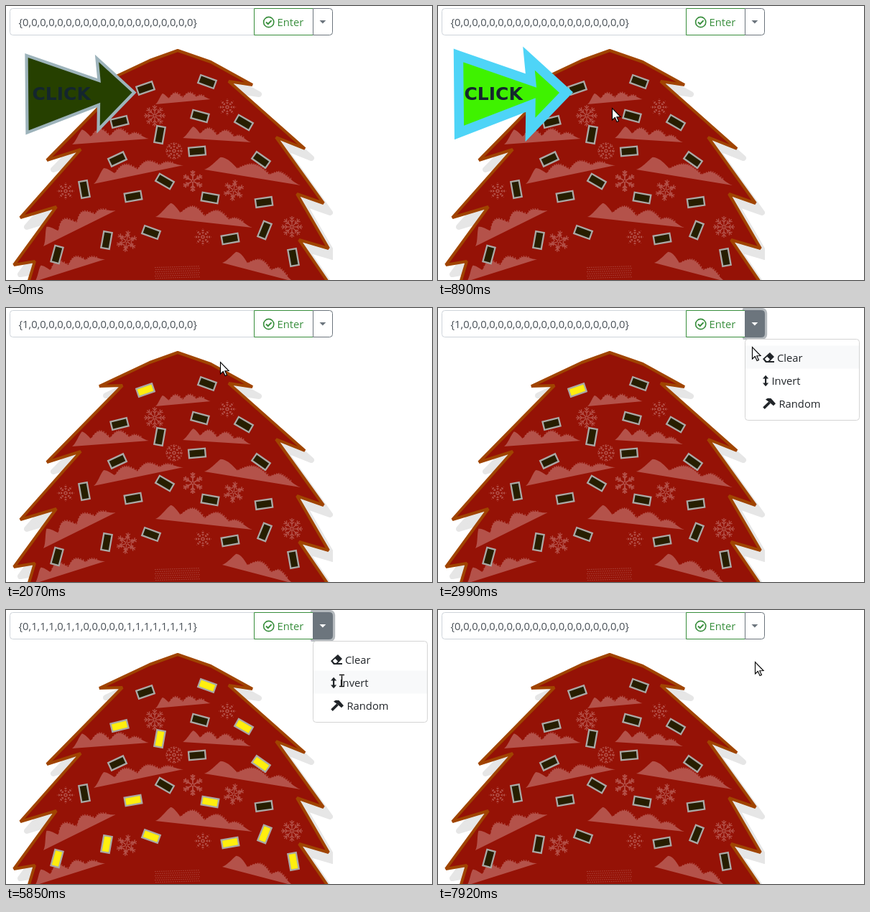
An HTML page with a canvas for the animation above (7990 ms loop, 593 by 382 pixels).

```html
<!DOCTYPE html>
<html lang="en">
<head>
<meta charset="utf-8">
<title>Tree lights</title>
<style>
html, body { margin: 0; width: 100%; height: 100%; overflow: hidden; background: #fff; }
canvas { display: block; }
</style>
</head>
<body>
<canvas id="stage" width="593" height="382"></canvas>
<script>
const W = 593, H = 382, LOOP = 7990;
const ctx = document.getElementById('stage').getContext('2d');
const FONT = '14.75px "Open Sans", "Noto Sans", sans-serif';
const GREY = [108, 117, 125], WHITE = [255, 255, 255];
const DARK = [38, 30, 0], LIT = [255, 238, 14];
const SNOW = '#b4524a';

const clamp = v => Math.max(0, Math.min(1, v));
const ease = k => k * k * (3 - 2 * k);
const mix = (a, b, k) => `rgb(${a.map((v, i) => Math.round(v + (b[i] - v) * k)).join()})`;

function poly(c, pts) {
  c.beginPath();
  pts.forEach(([x, y]) => c.lineTo(x, y));
  c.closePath();
}

function seg(c, x0, y0, x1, y1) {
  c.beginPath();
  c.moveTo(x0, y0);
  c.lineTo(x1, y1);
  c.stroke();
}

// ---------- tree ----------

// outline from the top: tip, notch, tip, notch ... on each side
const RIGHT = [[285, 78], [343, 110], [310, 105], [416, 199], [376, 183], [442, 275],
  [405, 262], [449, 338], [408, 326], [449, 386]];
const LEFT = [[200, 76], [130, 109], [162, 108], [57, 215], [104, 200], [20, 295],
  [70, 280], [11, 361], [40, 356], [31, 386]];
const TREE = [[239, 62], ...RIGHT, ...LEFT.reverse()];

// base line ends, hump count, height
const HILLS = [[208, 137, 285, 130, 4, 15], [92, 193, 199, 185, 4, 21], [246, 184, 341, 190, 4, 18],
  [122, 248, 247, 222, 4, 20], [276, 228, 410, 250, 3, 22], [52, 335, 153, 285, 4, 24],
  [208, 294, 343, 309, 4, 23], [40, 384, 138, 353, 4, 20], [301, 358, 400, 384, 3, 21]];

const FLAKES = { dots: [[308, 141], [83, 258], [274, 322]], line: [[207, 153], [398, 308]],
  ring: [[234, 202]], star: [[317, 257], [168, 328]], bold: [[260, 244]] };

function hill(c, x0, y0, x1, y1, n, h) {
  const len = Math.hypot(x1 - x0, y1 - y0);
  const top = u => -h * Math.min(1, u * 7, (1 - u) * 4) * (1 - .35 * u)
    * (.45 + .55 * Math.abs(Math.sin(Math.PI * n * u)));
  c.save();
  c.translate(x0, y0);
  c.rotate(Math.atan2(y1 - y0, x1 - x0));
  c.fillStyle = SNOW;
  c.beginPath();
  for (let x = 0; x <= len; x++) c.lineTo(x, top(x / len));
  c.lineTo(len, 0);
  c.fill();
  for (let x = len / n; x < len * .9; x += 3) c.fillRect(x, top(x / len) - 1.5, 1.3, 2);
  c.restore();
}

function flake(c, x, y, style) {
  const small = style === 'dots' || style === 'ring', r = small ? 12 : 15;
  const arms = style === 'star' || style === 'bold' ? 6 : 8;
  c.save();
  c.translate(x, y);
  c.strokeStyle = SNOW;
  c.lineWidth = style === 'bold' ? 1.8 : 1.3;
  if (small) c.setLineDash([2, 1.5]);
  if (style === 'ring') {
    c.beginPath();
    c.arc(0, 0, r * .9, 0, 7);
    c.stroke();
  }
  if (style === 'star') {
    c.rotate(.15);
    c.beginPath();
    for (let i = 0; i < 12; i++) {
      const a = i * Math.PI / 6, d = r * (i % 2 ? .4 : .8);
      c.lineTo(Math.sin(a) * d, -Math.cos(a) * d);
    }
    c.closePath();
    c.stroke();
  }
  for (let i = 0; i < arms; i++) {
    seg(c, 0, -1, 0, -r);
    for (const k of [.45, .7]) {
      seg(c, 0, -r * k, -r * .2, -r * (k + .2));
      seg(c, 0, -r * k, r * .2, -r * (k + .2));
    }
    c.rotate(2 * Math.PI / arms);
  }
  c.restore();
}

function makeTree() {
  const cv = document.createElement('canvas');
  cv.width = 455;
  cv.height = H;
  const c = cv.getContext('2d');
  // soft drop shadow
  c.save();
  c.translate(9, 13);
  poly(c, TREE);
  c.lineJoin = 'round';
  c.lineWidth = 8;
  c.fillStyle = c.strokeStyle = '#e6e6e6';
  c.fill();
  c.stroke();
  c.restore();

  poly(c, TREE);
  c.fillStyle = '#951206';
  c.fill();
  c.lineJoin = 'bevel';
  c.lineWidth = 4;
  c.strokeStyle = '#a04400';
  c.stroke();
  HILLS.forEach(h => hill(c, ...h));
  for (const style in FLAKES) FLAKES[style].forEach(([x, y]) => flake(c, x, y, style));
  c.fillStyle = '#a83d34';
  for (let y = 364; y < H; y += 3) {
    for (let x = 207 + y % 2; x < 270; x += 3) c.fillRect(x, y - (x - 207) * .03, 1.7, 1.1);
  }
  return cv;
}
const tree = makeTree();

// ---------- lights ----------

// x, y, angle in degrees
const LEDS = [[194, 114, -19], [280, 105, 20], [158, 161, -14], [270, 153, 15], [331, 162, 30],
  [214, 179, -80], [155, 213, -25], [266, 202, -5], [355, 214, 35], [221, 244, 30],
  [109, 255, 80], [177, 265, -10], [284, 267, 10], [359, 273, -8], [140, 326, -80],
  [202, 315, 20], [312, 324, -10], [360, 312, -68], [71, 346, -75], [400, 350, 80]];

const OFF = [0, 3, 6, 7, 9, 10, 13];
const RANDOM = '01110110000011111111';
const flip = s => [...s].map(d => 1 - d).join('');

const STATES = [
  { at: -LOOP, text: '0'.repeat(20), on: () => 0 },
  { at: 1360, text: '1' + '0'.repeat(19), on: i => +(i === 0) },
  { at: 4115, text: RANDOM, on: i => +!OFF.includes(i) },
  { at: 6010, text: flip(RANDOM), on: i => +OFF.includes(i) },
  { at: 7570, text: '0'.repeat(20), on: () => 0 }];

function drawLeds(t, n) {
  const now = STATES[n], old = STATES[Math.max(0, n - 1)], k = clamp((t - now.at) / 180);
  ctx.strokeStyle = '#aaa9a6';
  ctx.lineWidth = 2.3;
  LEDS.forEach(([x, y, deg], i) => {
    const a = old.on(i), b = now.on(i);
    ctx.save();
    ctx.translate(x, y + .5);
    ctx.rotate(deg * Math.PI / 180);
    ctx.fillStyle = mix(DARK, LIT, a + (b - a) * k);
    ctx.beginPath();
    ctx.rect(-11.5, -5.8, 23, 11.6);
    ctx.fill();
    ctx.stroke();
    ctx.restore();
  });
}

// ---------- pulsing arrow ----------

const ARROW = [[28.5, 69], [129.5, 104], [126.5, 73], [178.5, 120.5], [128.5, 172.5], [129, 138], [29.5, 176.5]];

function drawArrow(t) {
  const out = clamp((t - STATES[1].at) / 150);
  if (out >= 1) return;
  const phase = (.125 + t / 2222) % 1, p = 1 - Math.abs(1 - 2 * phase), w = 1 + 13 * p;
  ctx.save();
  ctx.globalAlpha = 1 - out;
  poly(ctx, ARROW);
  ctx.fillStyle = mix([29, 0, 0], [65, 255, 0], p);
  ctx.fill();
  ctx.lineWidth = w + (40 - w) * out;
  ctx.strokeStyle = mix([185, 167, 165], [72, 214, 252], p);
  ctx.stroke();
  ctx.fillStyle = '#14262e';
  ctx.font = 'bold 25px "DejaVu Sans", sans-serif';
  ctx.fillText('CLICK', 36.5, 131);
  ctx.restore();
}

// ---------- toolbar and menu ----------

// each visit opens the menu, then picks the item under x, y
const VISITS = [
  { open: 2590, pick: STATES[2].at, x: 486, y: 131 },
  { open: 5290, pick: STATES[3].at, x: 467, y: 98 },
  { open: 7030, pick: STATES[4].at, x: 458, y: 72 }];

const menuOpen = t => VISITS.some(v => t >= v.open && t < v.pick);
const fillLevel = t => Math.max(...VISITS.map(v =>
  clamp((t - v.open + 140) / 150) * (1 - clamp((t - v.pick - 70) / 150))));

function box(x, y, w, h, r, fill, line) {
  ctx.beginPath();
  ctx.roundRect(x, y, w, h, r);
  ctx.fillStyle = fill;
  ctx.fill();
  ctx.strokeStyle = line;
  ctx.lineWidth = 1;
  ctx.stroke();
}

function label(s, x, y, color) {
  ctx.font = FONT;
  ctx.fillStyle = color;
  ctx.fillText(s, x, y);
}

function drawBar(t, text) {
  const k = fillLevel(t), green = '#388e3c';
  box(5.5, 3.5, 340, 37, [4, 0, 0, 4], '#fff', '#ced4da');
  label('{' + [...text].join() + '}', 17.5, 28, '#495057');
  if (menuOpen(t)) {
    ctx.fillStyle = '#b5babe';
    ctx.beginPath();
    ctx.roundRect(423.8, 0, 34.4, 44, [2, 7, 7, 2]);
    ctx.fill();
  }
  box(345.5, 3.5, 82, 37, 0, '#fff', green);
  label('Enter', 377.5, 28, green);
  ctx.strokeStyle = green;
  ctx.lineWidth = 1.6;
  ctx.beginPath();
  ctx.arc(365.7, 22.5, 7.1, 0, 7);
  ctx.stroke();
  ctx.lineWidth = 2;
  ctx.beginPath();
  ctx.moveTo(362, 22.5);
  ctx.lineTo(364.8, 25.2);
  ctx.lineTo(369.6, 20.1);
  ctx.stroke();
  box(427.5, 3.5, 27, 37, [0, 4, 4, 0], mix(WHITE, GREY, k), '#6c757d');
  ctx.fillStyle = mix(GREY, WHITE, k);
  poly(ctx, [[436.5, 20], [445.3, 20], [440.9, 24.5]]);
  ctx.fill();
}

function drawIcons(ink) {
  ctx.fillStyle = ctx.strokeStyle = ink;
  // eraser
  poly(ctx, [[452, 71], [462, 62], [468, 68], [462, 74], [468, 74], [468, 76], [456, 76]]);
  ctx.fill();
  ctx.fillStyle = '#fff';
  poly(ctx, [[454.8, 71], [458.2, 67.8], [462, 71.6], [459.6, 74], [457.4, 74]]);
  ctx.fill();
  // double arrow
  ctx.fillStyle = ink;
  ctx.fillRect(455, 97, 2.2, 9);
  for (const d of [-1, 1]) {
    poly(ctx, [[452, 101.5 + 3 * d], [456.1, 101.5 + 7.7 * d], [460.2, 101.5 + 3 * d]]);
    ctx.fill();
  }
  // hammer
  ctx.lineWidth = 3.6;
  seg(ctx, 453.5, 139.6, 461.5, 131.8);
  poly(ctx, [[456, 127.5], [459, 125.7], [463.5, 126], [470, 133.2], [467, 136.2], [460, 130.5]]);
  ctx.fill();
}

function drawMenu(pos) {
  box(427.5, 43.5, 159, 113, 4, '#fff', '#d4d4d4');
  const row = Math.floor((pos.y - 52.5) / 32);
  if (pos.x > 428 && row >= 0 && row < 3) {
    ctx.fillStyle = '#f8f9fa';
    ctx.fillRect(428, 52.5 + row * 32, 158, 32);
  }
  const ink = '#212529';
  drawIcons(ink);
  label('Clear', 472, 75, ink);
  label('Invert', 464.5, 107, ink);
  label('Random', 474.5, 139, ink);
}

// ---------- pointer ----------

const BUTTON = [441, 24], EDGE = [437, 54], LAMP = [197, 111];

const PATH = [[70, 472, 327], [500, 397, 195], [810, 254, 150], [1200, ...LAMP], [1740, ...LAMP],
  ...VISITS.flatMap(({ open, pick, x, y }) => [
    [open - 100, ...BUTTON], [open + 30, ...BUTTON],
    [open + (pick - open) * .265, ...EDGE],
    [pick - 180, x, y], [pick + 200, x, y]]),
  [7910, 441, 72], [LOOP + 1, 441, 72]];

function pointerAt(t) {
  const i = PATH.findIndex(p => p[0] > t);
  const [t0, x0, y0] = PATH[i - 1], [t1, x1, y1] = PATH[i];
  const u = (t - t0) / (t1 - t0), k = t < 1700 ? u : ease(u);
  return { x: x0 + (x1 - x0) * k, y: y0 + (y1 - y0) * k };
}

function drawHand() {
  const hand = new Path2D();
  hand.roundRect(-1.7, 0, 3.6, 15, 1.8);
  for (let i = 0; i < 3; i++) hand.roundRect(1.6 + 2.8 * i, 5.6 + i, 3.2, 10, 1.6);
  hand.roundRect(-2.5, 10, 12.8, 12, [1, 1, 4, 4]);
  hand.moveTo(-2, 12);
  hand.lineTo(-5, 10.5);
  hand.lineTo(-6, 12.5);
  hand.lineTo(-1, 20);
  ctx.lineWidth = 2.2;
  ctx.stroke(hand);
  ctx.fill(hand);
  ctx.lineWidth = 1;
  for (let i = 0; i < 3; i++) seg(ctx, 1.8 + 2.8 * i, 7 + i, 1.8 + 2.8 * i, 11.5);
}

function drawPointer(pos, open) {
  const { x, y } = pos;
  const onButton = x > 427 && x < 456 && y < 41;
  const onLed = LEDS.some(([a, b]) => Math.hypot(a - x, b - y) < 9);
  ctx.save();
  ctx.translate(Math.round(x) + .5, Math.round(y) + .5);
  ctx.strokeStyle = '#000';
  ctx.fillStyle = '#fff';
  if (open && x > 451 && y > 60) {
    ctx.lineWidth = 1.4;
    seg(ctx, 0, -7, 0, 7);
    for (const d of [-8, 8]) seg(ctx, -3.5, d, 3.5, d);
  } else if (onButton || onLed) {
    drawHand();
  } else {
    ctx.lineWidth = 1.1;
    poly(ctx, [[0, 0], [0, 16.5], [3.8, 13], [6.6, 19], [9, 18], [6.3, 12.2], [11.6, 12]]);
    ctx.fill();
    ctx.stroke();
  }
  ctx.restore();
}

// ---------- loop ----------

function draw(t) {
  const n = STATES.filter(s => s.at <= t).length - 1;
  const open = menuOpen(t), pos = t >= 70 ? pointerAt(t) : null;
  ctx.fillStyle = '#fff';
  ctx.fillRect(0, 0, W, H);
  ctx.drawImage(tree, 0, 0);
  drawLeds(t, n);
  drawArrow(t);
  drawBar(t, STATES[n].text);
  if (open) drawMenu(pos);
  if (pos) drawPointer(pos, open);
}

const start = performance.now();
function tick() {
  draw((performance.now() - start) % LOOP);
  requestAnimationFrame(tick);
}
tick();
</script>
</body>
</html>
```
